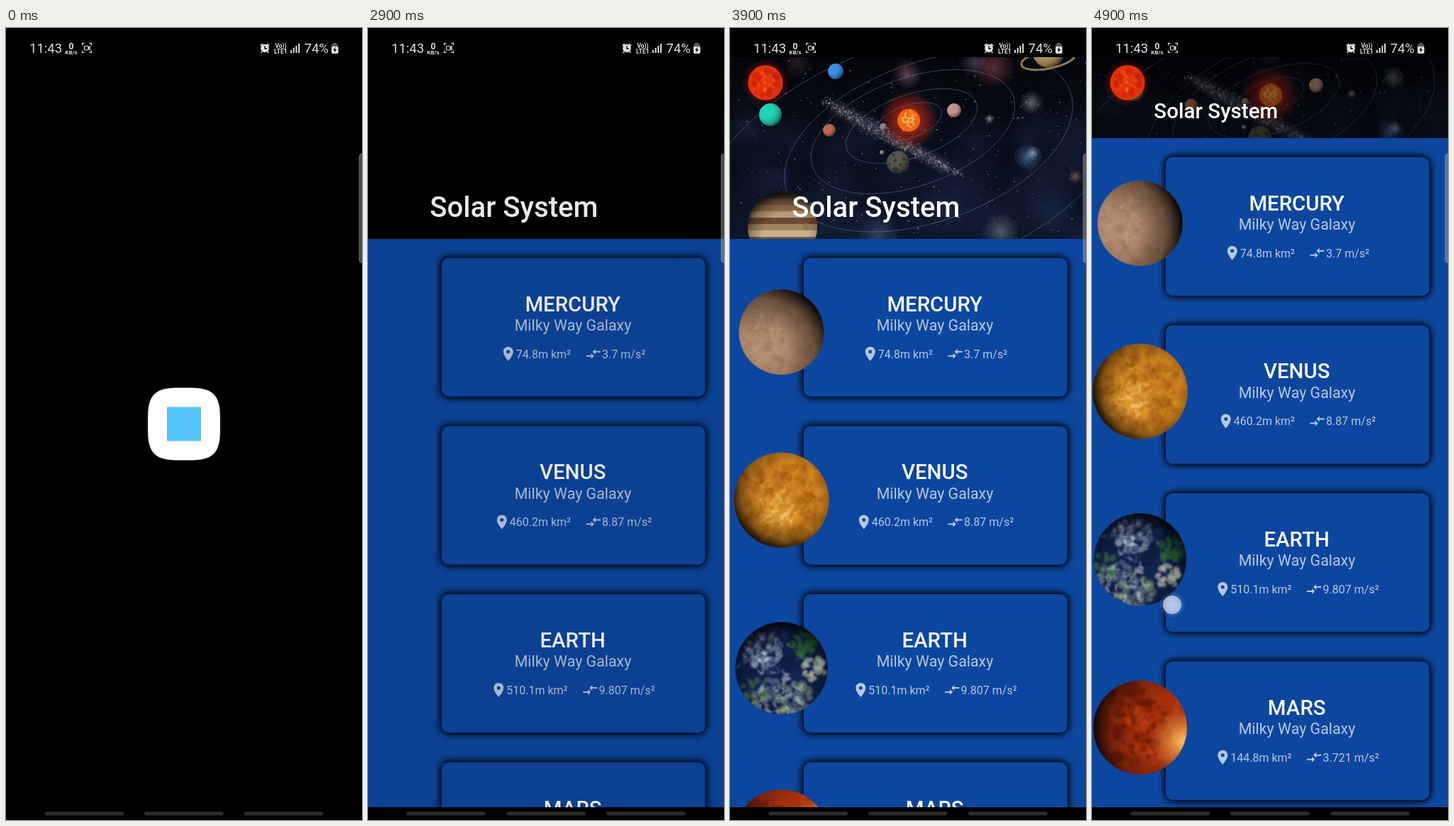
These frames come from a looping animation (502x1115 px, 5 s). An HTML page with a canvas:

```html
<!DOCTYPE html>
<html lang="en">
<head>
<meta charset="utf-8">
<title>Solar System app</title>
<style>
  html, body { margin: 0; width: 100%; height: 100%; overflow: hidden; background: #000; }
  canvas { display: block; }
</style>
</head>
<body>
<canvas id="stage" width="502" height="1115"></canvas>
<script>
const W = 502, H = 1115, TAU = Math.PI * 2, LOOP = 5000;
const BAR_BOTTOM = 41, NAV_TOP = 1097, HEADER = 256, TOOLBAR = 75;
const BLUE = '#0c469f';
const ctx = document.getElementById('stage').getContext('2d');

let seed = 7;
function rnd() {
  seed = (seed * 1664525 + 1013904223) % 4294967296;
  return seed / 4294967296;
}
const spread = () => rnd() + rnd() + rnd() - 1.5;
const clamp = v => Math.max(0, Math.min(1, v));

function layer(w, h) {
  const c = document.createElement('canvas');
  c.width = w;
  c.height = h;
  return c.getContext('2d');
}
function disc(g, x, y, r, fill) {
  g.fillStyle = fill;
  g.beginPath();
  g.arc(x, y, r, 0, TAU);
  g.fill();
}
function oval(g, x, y, a, b, tilt, fill) {
  g.fillStyle = fill;
  g.beginPath();
  g.ellipse(x, y, a, b, tilt, 0, TAU);
  g.fill();
}
function glow(g, x, y, r, rgb, alpha) {
  const fade = g.createRadialGradient(x, y, 0, x, y, r);
  fade.addColorStop(0, `rgba(${rgb},${alpha})`);
  fade.addColorStop(.5, `rgba(${rgb},${alpha * .45})`);
  fade.addColorStop(1, `rgba(${rgb},0)`);
  disc(g, x, y, r, fade);
}
function roundBox(g, x, y, w, h, r, fill) {
  g.fillStyle = fill;
  g.beginPath();
  g.roundRect(x, y, w, h, r);
  g.fill();
}
function label(g, text, x, y, font, fill, align = 'left') {
  g.font = font + ' Roboto, sans-serif';
  g.fillStyle = fill;
  g.textAlign = align;
  g.fillText(text, x, y);
}

// Shading on a sphere lit from (lx, ly), in units of its radius.
function shade(g, x, y, r, lx, ly, dark = .85) {
  const far = 1 + Math.hypot(lx, ly);
  const fade = g.createRadialGradient(x + lx * r, y + ly * r, r * .65, x + lx * r, y + ly * r, r * far);
  fade.addColorStop(0, 'rgba(0,0,0,0)');
  fade.addColorStop(.6, `rgba(0,0,0,${dark * .35})`);
  fade.addColorStop(1, `rgba(0,0,0,${dark})`);
  disc(g, x, y, r, fade);
}
function globe(g, x, y, r, fill) {
  disc(g, x, y, r, fill);
  shade(g, x, y, r, -.3, -.3, .7);
}

// Planet pictures, centred on the origin of their own layer.
function planet(r, base, light, paint) {
  const size = Math.ceil(r) * 2 + 4, g = layer(size, size);
  g.translate(size / 2, size / 2);
  g.save();
  g.beginPath();
  g.arc(0, 0, r, 0, TAU);
  g.clip();
  disc(g, 0, 0, r + 1, base);
  g.filter = 'blur(0.8px)';
  paint(g, r);
  g.restore();
  shade(g, 0, 0, r, ...light);
  return g.canvas;
}
function blotches(g, r, count, size, fill, cx = 0, cy = 0, reach = 1) {
  for (let i = 0; i < count; i++) {
    const a = rnd() * TAU, d = Math.sqrt(rnd()) * reach * r, s = size * (.3 + rnd());
    oval(g, cx * r + d * Math.cos(a), cy * r + d * Math.sin(a), s, s * (.4 + rnd() * .6), rnd() * 3, fill);
  }
}
function wisps(g, r, count, length, color, cx, cy, reach) {
  g.strokeStyle = color;
  g.lineCap = 'round';
  for (let i = 0; i < count; i++) {
    const x = (cx + spread() * reach) * r, y = (cy + spread() * reach) * r;
    const a = rnd() * TAU, l = length * (.4 + rnd());
    g.lineWidth = .6 + rnd() * 2;
    g.beginPath();
    g.moveTo(x, y);
    g.quadraticCurveTo(x + l * Math.cos(a), y + l * Math.sin(a), x + l * 1.5 * Math.cos(a + .7), y + l * 1.5 * Math.sin(a + .7));
    g.stroke();
  }
}

const mercury = planet(60, '#a17a5f', [-.4, .55, .97], (g, r) => {
  glow(g, -r * .3, r * .45, r, '205,165,135', .6);
  blotches(g, r, 40, 8, 'rgba(100,72,52,.1)');
  blotches(g, r, 110, 1.7, 'rgba(95,68,50,.25)');
  blotches(g, r, 50, 1.6, 'rgba(235,205,175,.35)', -.4, .25, .6);
});
const venus = planet(67, '#c47a1e', [.12, -.2, .9], (g, r) => {
  blotches(g, r, 80, 9, 'rgba(125,60,8,.15)');
  blotches(g, r, 60, 8, 'rgba(245,165,45,.16)');
  glow(g, 0, r * .2, r * .6, '250,185,70', .5);
  wisps(g, r, 90, 10, 'rgba(250,190,75,.3)', 0, .2, .75);
  wisps(g, r, 30, 7, 'rgba(255,230,140,.5)', 0, .2, .3);
  wisps(g, r, 40, 7, 'rgba(110,50,5,.35)', 0, -.2, 1);
});
const earth = planet(65, '#0f1d45', [.05, .25, .85], (g, r) => {
  blotches(g, r, 30, 10, 'rgba(30,60,115,.25)');
  blotches(g, r, 34, 6, 'rgba(48,104,48,.55)', .4, -.6, .28);
  blotches(g, r, 24, 6, 'rgba(195,198,175,.6)', .72, -.1, .25);
  blotches(g, r, 20, 5, 'rgba(70,118,60,.5)', -.5, .6, .28);
  blotches(g, r, 45, 6, 'rgba(135,150,115,.4)', .35, .6, .4);
  blotches(g, r, 55, 5, 'rgba(225,233,245,.2)', -.5, -.35, .45);
  blotches(g, r, 70, 5, 'rgba(235,240,245,.22)', .05, .75, .6);
  wisps(g, r, 50, 5, 'rgba(235,242,250,.4)', -.45, -.35, .45);
  wisps(g, r, 70, 5, 'rgba(240,245,250,.4)', .1, .7, .6);
});
const mars = planet(66, '#a5300d', [.4, -.3, .9], (g, r) => {
  blotches(g, r, 40, 10, 'rgba(90,14,4,.2)', -.25, .1, .8);
  blotches(g, r, 50, 5, 'rgba(225,90,25,.2)', .2, -.2, .8);
  blotches(g, r, 70, 4, 'rgba(65,10,4,.3)', .05, 0, .65);
  glow(g, r * .9, -r * .35, r * .7, '255,190,95', 1);
});

// Header picture.
const sky = (() => {
  const g = layer(W, 297);
  const night = g.createLinearGradient(0, BAR_BOTTOM, 0, 297);
  night.addColorStop(0, '#04050a');
  night.addColorStop(.5, '#070b17');
  night.addColorStop(1, '#0e162a');
  g.fillStyle = night;
  g.fillRect(0, 0, W, 297);

  for (let i = 0; i < 26; i++) glow(g, rnd() * W, 120 + rnd() * 180, 20 + rnd() * 45, '45,68,115', .18);
  for (let i = 0; i < 1100; i++) {
    disc(g, rnd() * W, 40 + rnd() * 257, .25 + rnd() ** 4 * .8, `rgba(190,208,245,${.15 + rnd() * .6})`);
  }

  // Nebulae and far galaxies: x, y, radius, colour
  [[250, 65, 22, '175,120,135'], [372, 55, 32, '170,85,95'], [345, 48, 22, '110,95,125'],
   [420, 182, 20, '110,165,225'], [427, 176, 10, '215,220,240'], [487, 209, 10, '220,130,110'],
   [382, 286, 26, '140,145,150'], [210, 292, 30, '80,95,130'], [366, 128, 7, '230,235,235'],
   [95, 50, 22, '70,45,60'], [425, 105, 17, '175,180,190']
  ].forEach(([x, y, r, rgb]) => {
    glow(g, x, y, r, rgb, .5);
    for (let i = 0; i < r; i++) disc(g, x + spread() * r, y + spread() * r * .7, .6, `rgba(${rgb},.5)`);
  });

  // Dust band
  const along = u => [133 + u * 190, 103 + u * 103];
  for (let i = 0; i < 14; i++) glow(g, ...along(.1 + i * .06), 15, '165,160,170', .22);
  for (let i = 0; i < 800; i++) {
    const u = rnd(), [x, y] = along(u), w = 13 * Math.sin(Math.PI * (.12 + u * .8));
    const rgb = rnd() < .35 ? '140,115,105' : '200,203,212';
    disc(g, x + spread() * 6, y + spread() * w, .3 + rnd() * .9, `rgba(${rgb},.38)`);
  }

  // Orbits: centre, half axes
  g.strokeStyle = 'rgba(125,150,205,.42)';
  g.lineWidth = 1;
  [[252, 132, 49, 23], [256, 138, 97, 44], [258, 146, 150, 76], [280, 160, 212, 112], [260, 185, 315, 165]]
    .forEach(([x, y, a, b]) => {
      g.beginPath();
      g.ellipse(x, y, a, b, -.34, 0, TAU);
      g.stroke();
    });

  glow(g, 252, 130, 42, '255,45,10', .95);
  disc(g, 252, 130, 16, '#ee651b');
  wisps(g, 16, 26, 4, 'rgba(255,195,85,.6)', 252 / 16, 130 / 16, .6);

  globe(g, 57, 122, 16, '#20d2b0');
  globe(g, 149, 61, 11, '#3b8ee0');
  globe(g, 140, 144, 9, '#bd6650');
  globe(g, 316, 116, 10, '#c59487');
  globe(g, 216, 139, 5, '#8b8581');
  globe(g, 214, 175, 3, '#8c8580');
  globe(g, 237, 189, 16, '#55554a');
  blotches(g, 16, 14, 3, 'rgba(25,32,32,.5)', 237 / 16, 189 / 16, .8);

  // Ringed planet at the top edge
  globe(g, 449, 34, 22, '#b8965f');
  g.strokeStyle = '#8d7a55';
  g.lineWidth = 3;
  g.beginPath();
  g.ellipse(449, 44, 39, 13, -.2, 0, TAU);
  g.stroke();

  // Banded giant
  g.save();
  g.beginPath();
  g.arc(74, 280, 49, 0, TAU);
  g.clip();
  ['#51402f', '#7a5a42', '#97714f', '#b89a78', '#6f4a35', '#a68361', '#c9b18e', '#7c543c', '#a98765']
    .forEach((color, i) => {
      g.fillStyle = color;
      g.fillRect(20, 231 + i * 9, 110, 10);
    });
  g.restore();
  shade(g, 74, 280, 49, .1, .25, .8);
  disc(g, 107, 280, 5, '#8c7354');
  return g.canvas;
})();

const redSun = (() => {
  const g = layer(84, 84);
  glow(g, 42, 42, 34, '255,45,5', .75);
  disc(g, 42, 42, 24.5, '#e8330c');
  g.filter = 'blur(0.8px)';
  blotches(g, 25, 30, 5, 'rgba(150,12,0,.25)', 42 / 25, 42 / 25, .8);
  wisps(g, 25, 18, 3, 'rgba(255,160,50,.5)', 42 / 25, 42 / 25, .55);
  return g.canvas;
})();

const worlds = [
  { name: 'MERCURY', area: '74.8m km²', gravity: '3.7 m/s²', picture: mercury },
  { name: 'VENUS', area: '460.2m km²', gravity: '8.87 m/s²', picture: venus },
  { name: 'EARTH', area: '510.1m km²', gravity: '9.807 m/s²', picture: earth },
  { name: 'MARS', area: '144.8m km²', gravity: '3.721 m/s²', picture: mars }
];
const pin = new Path2D('M12 2C8.13 2 5 5.13 5 9c0 5.25 7 13 7 13s7-7.75 7-13c0-3.87-3.13-7-7-7zm0 9.5a2.5 2.5 0 1 1 0-5 2.5 2.5 0 0 1 0 5z');
const arrows = new Path2D('M9 14H2v2h7v3l4-4-4-4v3zm6-1v-3h7V8h-7V5l-4 4 4 4z');

function icon(path, x, y, fill) {
  ctx.save();
  ctx.translate(x, y);
  ctx.fillStyle = fill;
  ctx.fill(path);
  ctx.restore();
}

function card({ name, area, gravity, picture }, top, t) {
  const middle = 289, soft = 'rgba(255,255,255,.7)', small = '16px';
  ctx.save();
  ctx.shadowColor = '#000';
  ctx.shadowBlur = 11;
  // Two passes deepen the shadow.
  for (let pass = 0; pass < 2; pass++) roundBox(ctx, 104, top, 371.5, 195, 10, BLUE);
  ctx.restore();
  label(ctx, name, middle - .3, top + 75, '500 29.4px', '#fff', 'center');
  label(ctx, 'Milky Way Galaxy', middle, top + 102.3, '21.4px', soft, 'center');

  ctx.font = small + ' Roboto, sans-serif';
  const areaWidth = ctx.measureText(area).width;
  const left = middle - .8 - (24 + areaWidth + 18.7 + 24 + ctx.measureText(gravity).width) / 2;
  const second = left + 24 + areaWidth + 18.7;
  icon(pin, left, top + 123, soft);
  label(ctx, area, left + 23, top + 140.8, small, soft);
  icon(arrows, second, top + 123, soft);
  label(ctx, gravity, second + 24.4, top + 140.8, small, soft);

  if (t < 3100) return;
  // The picture turns about a point beside its own centre.
  const turn = (t - 3600) / 12000 * TAU;
  ctx.save();
  ctx.translate(91, top + 90);
  ctx.rotate(turn);
  ctx.drawImage(picture, -16 - picture.width / 2, 17 - picture.height / 2);
  ctx.restore();
}

function header(scroll, loaded) {
  const bottom = BAR_BOTTOM + HEADER - scroll;
  const open = (HEADER - scroll - TOOLBAR) / (HEADER - TOOLBAR);
  ctx.save();
  ctx.beginPath();
  ctx.rect(0, BAR_BOTTOM, W, bottom - BAR_BOTTOM);
  ctx.clip();
  ctx.fillStyle = '#000';
  ctx.fillRect(0, 0, W, bottom);
  if (loaded) {
    ctx.globalAlpha = clamp(open / .414);
    ctx.drawImage(sky, 0, -scroll / 4);
    ctx.globalAlpha = 1;
    ctx.drawImage(redSun, 8, 35);
  }
  const size = 26.7 * (1 + open / 2);
  label(ctx, 'Solar System', 87.3, bottom - 21.4 - size * .23, `500 ${size}px`, '#fff');
  ctx.restore();
}

function splash() {
  ctx.fillStyle = '#fff';
  ctx.beginPath();
  const bend = v => Math.sign(v) * Math.abs(v) ** (2 / 3.5) * 51;
  for (let a = 0; a < TAU; a += .02) ctx.lineTo(251 + bend(Math.cos(a)), 557.5 + bend(Math.sin(a)));
  ctx.fill();
  ctx.fillStyle = '#54c5f8';
  ctx.fillRect(227, 533.5, 48, 48);
}

function statusBar(recording) {
  const ink = '#e2e2e2';
  label(ctx, '11:43', 33, 34.5, '18.5px', ink);
  label(ctx, '0', 92, 29.5, '700 12px', ink, 'center');
  label(ctx, 'KB/s', 92, 37, '700 8px', ink, 'center');

  ctx.strokeStyle = ink;
  ctx.lineWidth = 1.2;
  ctx.beginPath();
  for (const [x, dx] of [[107.6, 3], [120.4, -3]]) {
    for (const [y, dy] of [[21.6, 3], [34.4, -3]]) {
      ctx.moveTo(x + dx, y);
      ctx.lineTo(x, y);
      ctx.lineTo(x, y + dy);
    }
  }
  if (recording) {
    ctx.roundRect(110.5, 25.5, 5.5, 5.5, 1);
    ctx.moveTo(116, 28);
    ctx.lineTo(118, 26);
    ctx.lineTo(118, 30.5);
    ctx.closePath();
  }
  ctx.stroke();

  // Alarm clock
  disc(ctx, 365, 28.5, 5.8, ink);
  ctx.lineWidth = 1.8;
  ctx.beginPath();
  ctx.moveTo(359, 25); ctx.lineTo(362, 22.3);
  ctx.moveTo(371, 25); ctx.lineTo(368, 22.3);
  ctx.moveTo(361, 33); ctx.lineTo(360, 35);
  ctx.moveTo(369, 33); ctx.lineTo(370, 35);
  ctx.stroke();
  ctx.strokeStyle = '#000';
  ctx.lineWidth = 1.3;
  ctx.beginPath();
  ctx.moveTo(365, 25); ctx.lineTo(365, 29); ctx.lineTo(368, 29);
  ctx.stroke();

  label(ctx, 'Vo))', 387.5, 27.5, '700 8.5px', ink, 'center');
  label(ctx, 'LTE1', 387.3, 36, '700 8.5px', ink, 'center');
  ctx.fillStyle = ink;
  for (let i = 0; i < 4; i++) ctx.fillRect(401 + i * 3.7, 31 - i * 3, 2, 4 + i * 3);
  label(ctx, '74%', 420.5, 34.5, '18.5px', ink);

  // Battery
  roundBox(ctx, 461, 21, 5, 3, 1, '#666');
  roundBox(ctx, 459, 22.5, 9.5, 13.5, 2, '#555');
  roundBox(ctx, 459, 26, 9.5, 10, 2, ink);
  ctx.fillStyle = '#000';
  ctx.fill(new Path2D('M464.8 26.5l-3.6 4.8h2.3l-.9 3.4 3.8-4.8h-2.4z'));
}

function systemChrome() {
  ctx.fillStyle = '#000';
  ctx.fillRect(0, NAV_TOP, W, H - NAV_TOP);
  for (const x of [54.5, 195, 336]) roundBox(ctx, x, 1103.2, 111.5, 5.4, 2.7, '#2c2c2c');
  roundBox(ctx, 498, 177, 8, 153.5, 4, 'rgba(185,185,185,.4)');
  ctx.strokeStyle = 'rgba(190,190,190,.4)';
  ctx.lineWidth = 1;
  ctx.stroke();
}

function page(t) {
  const scroll = 142 * clamp((t - 4500) / 400) ** 1.5;
  ctx.fillStyle = BLUE;
  ctx.fillRect(0, BAR_BOTTOM, W, NAV_TOP - BAR_BOTTOM);
  worlds.forEach((world, i) => card(world, 323.7 + i * 236.7 - scroll, t));
  header(scroll, t >= 3100);
  if (t >= 4500) {
    const y = 954 - scroll;
    glow(ctx, 113, y, 19, '255,255,255', .5);
    disc(ctx, 113, y, 13, 'rgba(205,215,240,.75)');
  }
  const reveal = 1 - (1 - clamp((t - 2400) / 600)) ** 1.4;
  ctx.fillStyle = `rgba(0,0,0,${1 - reveal})`;
  ctx.fillRect(0, 0, W, NAV_TOP);
}

function draw(t) {
  ctx.fillStyle = '#000';
  ctx.fillRect(0, 0, W, H);
  if (t < 2500) splash();
  else page(t);
  systemChrome();
  statusBar((t + 300) % 1000 < 500);
}

function tick() {
  draw(Math.floor(performance.now() % LOOP / 100) * 100);
  requestAnimationFrame(tick);
}
tick();
</script>
</body>
</html>
```
